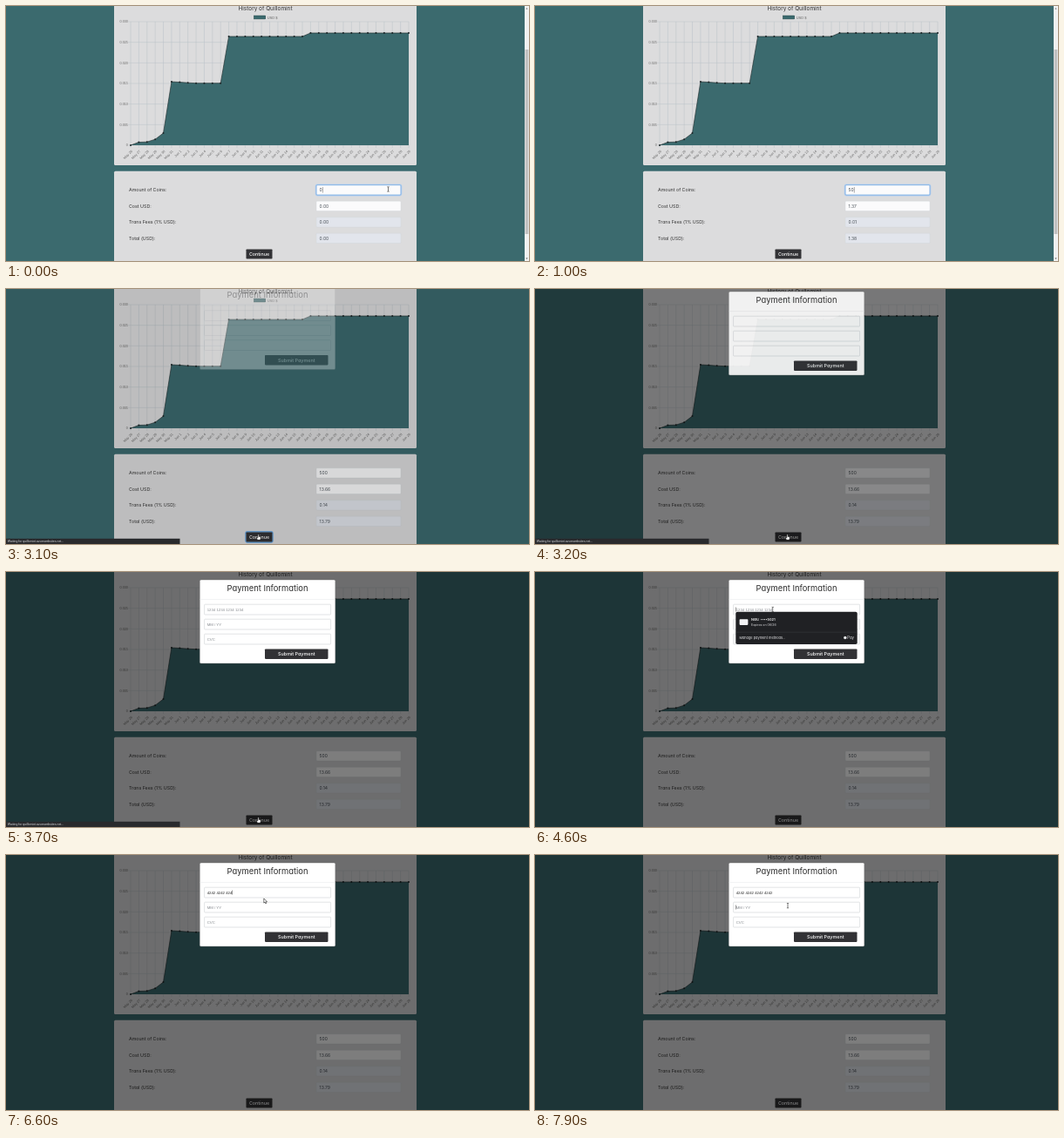
Recreate the animation shown at these times as an HTML page. Size 600x293 px, loop 8000 ms.

```html
<!DOCTYPE html>
<html lang="en">
<head>
<meta charset="utf-8">
<title>Coin purchase</title>
<style>
  html, body { margin: 0; width: 100%; height: 100%; overflow: hidden; background: #3b6a6e; }
  svg { display: block; width: 600px; height: 293px; }
  text { font-family: Inter, "Open Sans", sans-serif; font-feature-settings: "cv11"; white-space: pre; }
  .plain { font-family: "Liberation Sans", sans-serif; }
</style>
</head>
<body>
<svg id="stage" viewBox="0 0 600 293"></svg>
<script>
const LOOP = 8000, STEP = 100;
const TEAL = '#3b6a6e', PANEL = '#dcdcdd', DARK = '#323235';

// ---------- markup helpers ----------
const rect = (x, y, w, h, fill, more = '') =>
  `<rect x="${x}" y="${y}" width="${w}" height="${h}" fill="${fill}" ${more}/>`;
const text = (x, y, size, fill, str, more = '') =>
  `<text x="${x}" y="${y}" font-size="${size}" fill="${fill}" ${more}>${str}</text>`;
const path = (d, more) => `<path d="${d}" ${more}/>`;
const group = (id, body) => `<g id="${id}">${body}</g>`;
const mid = 'text-anchor="middle"';
const plain = 'class="plain"';

// ---------- chart ----------
const CHART = { left: 143, right: 462, top: 18, bottom: 160, days: 35 };
const dayX = i => CHART.left + i * (CHART.right - CHART.left) / (CHART.days - 1);

function priceY(i) {
  if (i < 8) return [160, 156.5, 156.2, 153.2, 146, 87, 87.5, 88.2][i];
  return i < 12 ? 88.7 : i < 22 ? 35 : 31;
}

function chart() {
  const { left, right, top, bottom, days } = CHART;
  let grid = '', labels = '', line = '', dots = '';
  for (let i = 0; i < 7; i++) {
    const y = top + i * (bottom - top) / 6;
    grid += `M${left - 3} ${y}H${right}`;
    const value = i < 6 ? (0.03 - i * 0.005).toFixed(3) : '0';
    labels += text(139.8, y + 1.3, 3.7, '#666', value, plain + ' text-anchor="end"');
  }
  for (let i = 0; i < days; i++) {
    const x = dayX(i), y = priceY(i);
    grid += `M${x} ${top}V${bottom + 3}`;
    line += `${i ? 'L' : 'M'}${x} ${y}`;
    dots += `<circle cx="${x}" cy="${y}" r="1" fill="#1d2628"/>`;
    const day = i < 6 ? `May ${26 + i}` : `Jun ${i - 5}`;
    labels += text(0, 0, 3.9, '#666', day,
      `${plain} text-anchor="end" transform="translate(${x + 2.2} 167.2) rotate(-45)"`);
  }
  return path(grid, 'fill="none" stroke="#b9c1c7" stroke-width=".5"') +
    path(`${line}V${bottom}H${left}Z`, `fill="${TEAL}"`) +
    path(line, 'fill="none" stroke="#263436" stroke-width=".7"') + dots + labels +
    text(297.5, 4.6, 6.45, '#333', 'History of Quillomint', mid) +
    rect(284.3, 11, 13.5, 4, TEAL, 'stroke="#2a4548" stroke-width=".4"') +
    text(299.7, 14.6, 4, '#666', 'USD $', plain);
}

// ---------- order form ----------
const ROWS = ['Amount of Coins:', 'Cost USD:', 'Trans Fees (1% USD):', 'Total (USD):'];
const rowY = i => 205.7 + i * 18.5;

function form() {
  const rows = ROWS.map((label, i) =>
    text(141, rowY(i) + 7.4, 5.3, '#333', label) +
    rect(356, rowY(i), 97, 11.4, i < 2 ? '#fbfbfc' : '#e2e5ec',
      'rx="1" stroke="#ced4da" stroke-width=".4"') +
    (i ? '' : group('focus',
      rect(355.4, rowY(0) - .6, 98.2, 12.6, 'none', 'rx="1.6" stroke="#9cc6f5" stroke-opacity=".6" stroke-width="1.4"') +
      rect(356, rowY(0), 97, 11.4, 'none', 'rx="1" stroke="#6ea8e8" stroke-width=".7"'))) +
    text(359.6, rowY(i) + 7.5, 5, '#495057', '', `id="value${i}"`)).join('');
  return rows + rect(0, 208, .4, 6.6, '#333', 'id="amountCaret"') +
    rect(275, 279, 31, 12, 'none', 'id="buttonGlow" rx="1.5" stroke="#57a0e6" stroke-width="1.3"') +
    rect(275.5, 279.5, 30, 11, DARK, 'rx=".8"') +
    text(290.5, 286.9, 5.35, '#fff', 'Continue', mid + ' font-weight="500"');
}

function scrollbar() {
  return rect(595, 0, 5, 293, '#f1f1f1') + rect(595.6, 50, 3.8, 212, '#c1c1c1') +
    path('M596.4 3.6L597.5 2.2 598.6 3.6ZM596.4 289.6L597.5 291 598.6 289.6Z', 'fill="#555"');
}

// ---------- payment dialog ----------
const FIELD_Y = [37.2, 54.2, 71.2];

function modal() {
  const fields = FIELD_Y.map(y =>
    rect(227.6, y, 145, 11.8, '#fff', 'rx=".8" stroke="#cfd2d6" stroke-width=".6"')).join('');
  const hint = (i, str, id) =>
    text(230.7, FIELD_Y[i] + 7.4, 4.3, '#85898e', str, `${plain} id="${id}"`);
  return rect(222.3, 9, 155.5, 96, '#fff', 'rx="1.5" stroke="#777" stroke-width=".4"') +
    text(300, 22.3, 9.4, '#2b2b2b', 'Payment Information', mid) +
    path('M222.5 31.6H377.5', 'stroke="#e4e6e8" stroke-width=".5"') + fields +
    group('hints', hint(0, '', 'card') + hint(1, 'MM / YY', 'expiry') + hint(2, 'CVC', 'cvc')) +
    rect(0, 0, .45, 5, '#222', 'id="cardCaret"') +
    rect(297, 88.5, 72.5, 11.4, DARK, 'rx=".8"') +
    text(333.3, 96.2, 5.4, '#fff', 'Submit Payment', mid + ' font-weight="500"');
}

function dropdown() {
  return rect(230.3, 45.8, 139.4, 37.2, '#202124', 'rx="1.8"') +
    rect(234.6, 54.3, 9.8, 6.6, '#f2f3f5', 'rx=".8"') +
    text(248, 55.8, 3.9, '#f1f1f1', 'Nolu  ••••5021', 'font-weight="600"') +
    text(248, 62, 3.55, '#d8d8da', 'Expires on 06/26') +
    path('M230.5 69.2H369.5', 'stroke="#3d3f43" stroke-width=".5"') +
    text(234.4, 77, 3.9, '#e4e5e7', 'Manage payment methods...') +
    '<circle cx="355.8" cy="75.5" r="1.7" fill="#e4e5e7"/>' +
    text(358.2, 77.2, 4.3, '#e4e5e7', 'Pay');
}

function statusBar() {
  return rect(0, 286.8, 199.5, 6.2, '#292a2d') +
    text(1.8, 291.2, 3.5, '#d5d7da', 'Waiting for quillomint.azurewebsites.net...', plain);
}

const outline = 'stroke="#111" stroke-width=".55" stroke-linejoin="round"';
const POINTERS = {
  arrow: path('M0 0V5.2L1.2 4.1 2 6 2.9 5.6 2.1 3.8H3.7Z', 'fill="#fff" ' + outline),
  beam: path('M-1.1 -2.7H-.2L0 -2.4 .2 -2.7H1.1M0 -2.4V2.4M-1.1 2.7H-.2L0 2.4 .2 2.7H1.1',
    'fill="none" stroke="#222" stroke-width=".6"'),
  hand: path('M-.6 -2.8Q0 -3.5 .6 -2.8V-.6L2.6 0Q3 .4 2.8 1.6L2.2 3.3H-1L-2.4 .8Q-2.2 0 -.6 1Z',
    'fill="#fff" ' + outline),
};

const stage = document.getElementById('stage');
stage.innerHTML =
  rect(0, 0, 600, 293, TEAL) +
  rect(124, -4, 347, 187, PANEL, 'rx="1.5"') + rect(124, 189.7, 347, 108, PANEL, 'rx="1.5"') +
  chart() + form() + group('scrollbar', scrollbar()) +
  rect(0, 0, 600, 293, '#000', 'id="backdrop"') +
  group('modal', modal()) + group('dropdown', dropdown()) + group('status', statusBar()) +
  group('pointer', Object.keys(POINTERS).map(k => group(k, POINTERS[k])).join(''));

const el = {};
stage.querySelectorAll('[id]').forEach(node => { el[node.id] = node; });

// ---------- timeline ----------
const show = (node, on) => node.setAttribute('visibility', on ? 'inherit' : 'hidden');
const fade = (node, alpha) => node.setAttribute('opacity', alpha);
const blink = (t, since) => Math.floor((t - since) / 500) % 2 === 0;

// Linear interpolation through [time, value] stops.
function ramp(t, stops) {
  if (t <= stops[0][0]) return stops[0][1];
  for (let i = 1; i < stops.length; i++) {
    const [t0, a] = stops[i - 1], [t1, b] = stops[i];
    if (t <= t1) return a + (b - a) * (t - t0) / (t1 - t0);
  }
  return stops[stops.length - 1][1];
}

// The last stop already reached.
const latest = (t, stops) => stops.filter(s => s[0] <= t).pop();

const ORDERS = [
  [0, '0', '0.00', '0.00', '0.00'],
  [800, '5', '0.14', '0.00', '0.14'],
  [1000, '50', '1.37', '0.01', '1.38'],
  [1200, '500', '13.66', '0.14', '13.79'],
];

const KEYS = [[0, 0], [5300, 1], [5400, 2], [5500, 3], [5600, 4], [5700, 6], [5800, 7], [5900, 8],
  [6000, 9], [6300, 11], [6400, 12], [6600, 13], [6700, 15], [6800, 16], [6900, 17], [7000, 18], [7200, 19]];

const TRAIL = [[0, 438.5, 210.5], [1800, 438.5, 210.5], [2000, 425, 226], [2100, 410.3, 238],
  [2300, 352, 266], [2500, 300, 283.5], [2700, 289.5, 285], [3800, 289.5, 285], [4000, 290, 230],
  [4200, 281, 95], [4400, 272.7, 43], [4900, 272.7, 43], [5400, 291, 49], [5700, 295.8, 49.2],
  [6700, 295.8, 50], [7400, 290, 58.2]];

function pointerKind(x, y, t) {
  const modalOpen = t >= 3100;
  const inside = (l, top, w, h) => x > l && x < l + w && y > top && y < top + h;
  if (inside(275, 279, 31, 12) && t < 3900) return 'hand';
  if (modalOpen) return FIELD_Y.some(top => inside(227, top, 146, 11.8)) ? 'beam' : 'arrow';
  return inside(356, rowY(0), 97, 11.4) || inside(356, rowY(1), 97, 11.4) ? 'beam' : 'arrow';
}

function drawForm(t) {
  const order = latest(t, ORDERS);
  ROWS.forEach((_, i) => { el['value' + i].textContent = order[i + 1]; });
  const focused = t < 2700;
  show(el.focus, focused);
  show(el.buttonGlow, t >= 2700 && t < 3200);
  el.amountCaret.setAttribute('x', 359.8 + el.value0.getComputedTextLength());
  show(el.amountCaret, focused && blink(t, t < 700 ? 0 : t < 1200 ? t : 1200));
  show(el.scrollbar, t < 3000);
}

function drawModal(t) {
  fade(el.backdrop, ramp(t, [[3000, 0], [3100, .14], [3200, .46], [3300, .5]]));
  fade(el.modal, ramp(t, [[3000, 0], [3100, .3], [3200, .9], [3300, 1]]));
  const lift = ramp(t, [[3000, -16], [3100, -12.5], [3200, -6], [3300, -2], [3400, 0]]);
  el.modal.setAttribute('transform', `translate(0 ${lift})`);
  show(el.hints, t >= 3500);

  const count = latest(t, KEYS)[1];
  el.card.textContent = count ? '4242 4242 4242 4242'.slice(0, count) : '1234 1234 1234 1234';
  el.card.setAttribute('fill', count ? '#222' : '#85898e');
  const onExpiry = t >= 7700;
  const width = count && !onExpiry ? el.card.getComputedTextLength() : 0;
  el.cardCaret.setAttribute('x', 230.4 + width);
  el.cardCaret.setAttribute('y', FIELD_Y[onExpiry ? 1 : 0] + 3.3);
  show(el.cardCaret, t >= 4500 && (onExpiry || blink(t, t < 5300 ? 4500 : latest(t, KEYS)[0])));

  const alpha = t < 5000
    ? ramp(t, [[4300, 0], [4500, 1]])
    : ramp(t, [[5500, 1], [5700, .72], [5900, .25], [6100, 0]]);
  const scale = t < 5000 ? 1 : 1 - .07 * (1 - alpha);
  fade(el.dropdown, alpha);
  el.dropdown.setAttribute('transform', `translate(300 64.4) scale(${scale}) translate(-300 -64.4)`);
}

function drawPointer(t) {
  const x = ramp(t, TRAIL.map(p => [p[0], p[1]]));
  const y = ramp(t, TRAIL.map(p => [p[0], p[2]]));
  const kind = pointerKind(x, y, t);
  el.pointer.setAttribute('transform', `translate(${x} ${y})`);
  show(el.pointer, t < 700 || t >= 1700);
  Object.keys(POINTERS).forEach(k => el[k].setAttribute('display', k === kind ? 'inline' : 'none'));
}

function frame(now) {
  const t = Math.floor((now % LOOP) / STEP) * STEP;
  drawForm(t);
  drawModal(t);
  show(el.status, t >= 2900 && t < 3900);
  drawPointer(t);
  requestAnimationFrame(frame);
}

const start = performance.now();
requestAnimationFrame(function first() { frame(Math.max(0, performance.now() - start)); });
</script>
</body>
</html>
```
